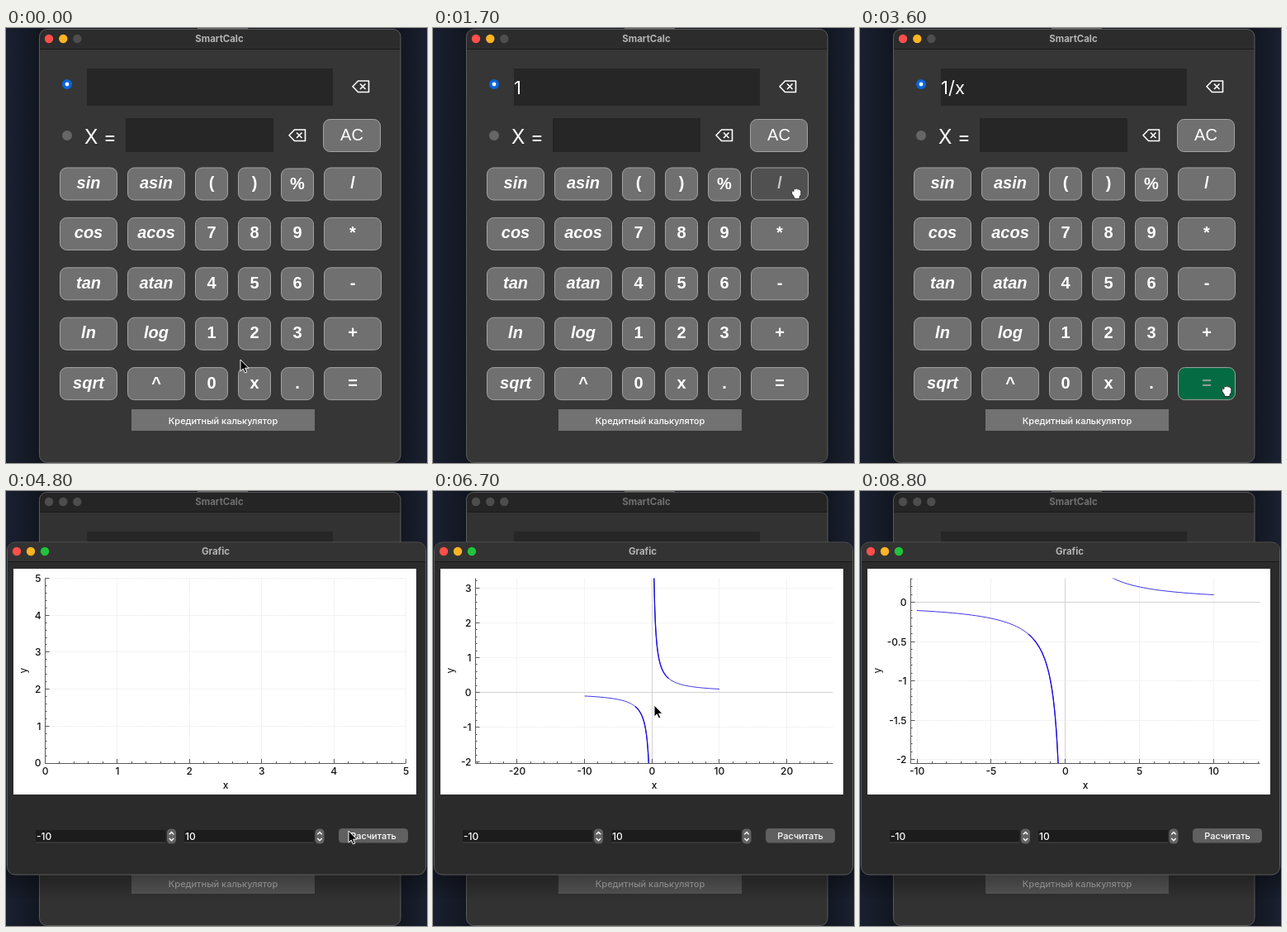
Write an HTML page that moves like this. It is 510 px wide and 526 px high and loops after 9400 ms.

```html
<!DOCTYPE html>
<html lang="ru">
<head>
<meta charset="utf-8">
<title>SmartCalc</title>
<style>
html, body { margin: 0; width: 100%; height: 100%; overflow: hidden; background: #161b27; }
svg { display: block; width: 510px; height: 526px; }
text { font-family: Inter, "Open Sans", sans-serif; fill: #fff; }
.title { font-size: 11.4px; font-weight: 700; fill: #b4b4b4; text-anchor: middle; }
.small { font-size: 11px; font-weight: 500; text-anchor: middle; }
.key rect { fill: #707070; stroke: #a3a3a3; }
.key text { font: bold 20px "Liberation Sans", Arial, sans-serif; text-anchor: middle; }
.key.fn text { font-style: italic; }
.key.ac text { font-weight: 400; }
.key.hover rect { fill: #505050; }
.key.hover text { fill: #c6c6c6; }
.key.eq.hover rect { fill: #046b43; }
.key.eq.hover text { fill: #8b9d94; }
.entry { font-size: 22px; }
.field { fill: #262626; }
.erase { fill: none; stroke: #fff; stroke-width: 1.6; stroke-linejoin: round; }
.spin { font-size: 12px; font-weight: 500; }
.dim .title { fill: #707070; }
.dim .bar { fill: #252525; }
.dim .body { fill: #323232; }
.dim .light { fill: #4d4d4d; }
.dim .credit rect { fill: #565656; }
.dim .credit text { fill: #a8a8a8; }
#plot text { font-size: 12px; font-weight: 500; fill: #111; }
#plot path { fill: none; }
.grid { stroke: #ececec; stroke-dasharray: 2 1; }
.zero { stroke: #d2d2d2; }
.axis { stroke: #5a5a5a; }
.curve { stroke: #2a1ee0; stroke-width: .9; }
.steep { stroke: #1a0ce0; stroke-width: 1.3; }
</style>
</head>
<body>
<svg viewBox="0 0 510 526">
  <defs>
    <linearGradient id="desk">
      <stop offset="0" stop-color="#1a2030"/><stop offset=".08" stop-color="#121620"/>
      <stop offset=".93" stop-color="#121620"/><stop offset="1" stop-color="#1a2030"/>
    </linearGradient>
    <linearGradient id="shade" x2="0" y2="1">
      <stop offset="0" stop-opacity=".4"/><stop offset="1" stop-opacity="0"/>
    </linearGradient>
    <clipPath id="win"><rect x="40.5" y="1.5" width="437.5" height="524" rx="9"/></clipPath>
    <clipPath id="area"><rect id="areaBox" y="105.5" height="223.5"/></clipPath>
    <g id="erase" class="erase">
      <path d="M7.5 1H20.5V14.5H7.5L1 7.8Z"/><path d="M10 4.5L16.5 11M16.5 4.5L10 11"/>
    </g>
    <g id="step">
      <rect width="11" height="18" rx="4.5" fill="#626262"/>
      <path d="M2.8 6.8L5.5 4L8.2 6.8M2.8 11.4L5.5 14.2L8.2 11.4" fill="none" stroke="#fff" stroke-width="1.4"/>
    </g>
  </defs>

  <rect width="510" height="526" fill="url(#desk)"/>
  <rect x="232" width="61" height="1" fill="#666"/>

  <g id="calc">
    <g clip-path="url(#win)">
      <rect class="body" x="40" y="1" width="439" height="525" fill="#363636"/>
      <rect class="bar" x="40" y="1" width="439" height="24" fill="#2c2c2c"/>
      <rect x="40" y="25" width="439" height="1" fill="#1c1c1c"/>
    </g>
    <rect x="40.5" y="1.5" width="437.5" height="524" rx="9" fill="none" stroke="#5b5b5b"/>
    <circle class="light" cx="52" cy="13" r="5.2" fill="#ff4f4b"/>
    <circle class="light" cx="69.3" cy="13" r="5.2" fill="#ffb423"/>
    <circle class="light" cx="86.3" cy="13" r="5.2" fill="#4e4e4e"/>
    <text class="title" x="258.5" y="16.6">SmartCalc</text>
    <rect class="field" x="98" y="49" width="298" height="45"/>
    <rect class="field" x="145" y="109" width="179" height="41"/>
    <circle cx="74" cy="68" r="6" fill="#0a66dc"/><circle cx="74" cy="68" r="2.4" fill="#fff"/>
    <circle cx="74" cy="130" r="6" fill="#666"/>
    <text x="95" y="140" font-size="24">X =</text>
    <text id="entry" class="entry" x="98" y="80"></text>
    <use href="#erase" x="419" y="63"/><use href="#erase" x="342" y="122"/>
    <g id="keys"></g>
    <g class="credit">
      <rect x="152" y="461" width="222" height="26" fill="#727272"/>
      <text class="small" x="263" y="479">Кредитный калькулятор</text>
    </g>
  </g>

  <g id="graph">
    <rect x="0" y="455" width="510" height="40" fill="url(#shade)"/>
    <rect x="1.5" y="62" width="507" height="402" rx="9.5" fill="#2b2b2b" stroke="#5a5a5a"/>
    <path d="M2 85V72Q2 62.5 11 62.5H499Q508 62.5 508 72V85Z" fill="#333"/>
    <rect x="2" y="85" width="506" height="1" fill="#191919"/>
    <circle cx="13" cy="73" r="5.2" fill="#ff4f4b"/>
    <circle cx="30" cy="73" r="5.2" fill="#ffb423"/>
    <circle cx="47" cy="73" r="5.2" fill="#1fc43c"/>
    <text class="title" x="254" y="76.7">Grafic</text>
    <rect x="9" y="94" width="488" height="273" fill="#fff"/>
    <g id="plot"></g>
    <rect x="36" y="410" width="157" height="15" fill="#1c1c1c"/><rect x="36" y="424.5" width="157" height="1" fill="#484848"/>
    <rect x="216" y="410" width="157" height="15" fill="#1c1c1c"/><rect x="216" y="424.5" width="157" height="1" fill="#484848"/>
    <text class="spin" x="37" y="422">-10</text>
    <text class="spin" x="217" y="422">10</text>
    <use href="#step" x="195" y="408.5"/><use href="#step" x="374.5" y="408.5"/>
    <rect id="run" x="403" y="408" width="84" height="17.5" rx="4.5" fill="#606060"/>
    <text class="small" x="445" y="420.6">Расчитать</text>
  </g>

  <g id="pointer">
    <path id="arrow" d="M0 0V14L3.3 11L5.5 16L7.8 15L5.6 10.2H10Z" fill="#000" stroke="#fff"/>
    <path id="hand" d="M-5.5 -2Q-4.5 -4 -3 -2.5V-4.5Q-1.8 -6.5 -.8 -5Q.5 -6.8 1.8 -5Q3.2 -6 4 -4.3Q5.8 -4.6 5.8 -2.5V1.5L4 4V6.5H-2.5V4.5L-5.3 .5Z" fill="#fff" stroke="#222" stroke-width=".9"/>
  </g>
</svg>
<script>
const $ = id => document.getElementById(id);
const LOOP = 9400, TICK = 100, OPEN = 3700, DRAWN = 5500, HIDE = 8800;

// Calculator keys
const cols = [[65, 70], [147, 70], [229, 40], [281, 40], [333, 40], [385, 70]];
const rows = ['sin asin ( ) % /', 'cos acos 7 8 9 *', 'tan atan 4 5 6 -', 'ln log 1 2 3 +', 'sqrt ^ 0 x . ='];
const keys = [];

function addKey(label, x, y, w, kind) {
  $('keys').insertAdjacentHTML('beforeend',
    `<g class="key ${kind}"><rect x="${x + .5}" y="${y + .5}" width="${w - 1}" height="39" rx="8"/>` +
    `<text x="${x + w / 2}" y="${y + 25.5}">${label}</text></g>`);
  keys.push({ el: $('keys').lastChild, x, y, w });
}
rows.forEach((row, r) => row.split(' ').forEach((label, c) => {
  const kind = label === '=' ? 'eq' : /[a-z]{2}/.test(label) ? 'fn' : '';
  addKey(label, cols[c][0], 168.5 + r * 60.4 + (label === '%' ? 1 : 0), cols[c][1], kind);
}));
addKey('AC', 384, 110, 70, 'ac');

// Tracks: [time, values...]
const pointerTrack = [
  [0, 284, 401], [600, 251, 374], [1000, 250, 373], [1600, 438, 202], [1700, 440, 200],
  [1900, 440, 200], [2000, 432, 224], [2400, 296, 432], [2500, 301, 432], [2900, 301, 432],
  [3400, 442, 438], [3600, 444, 439], [3700, 443, 434], [4000, 443, 434], [4500, 333, 298],
  [4600, 333, 298], [4800, 415, 411], [5200, 428, 418], [5400, 428, 418], [5600, 377, 388],
  [5800, 268, 259], [7100, 268, 259], [7600, 288, 163], [7700, 288, 163], [8200, 277, 152],
  [8300, 277, 152], [8800, 266, 142]
];
const zoomTrack = [[5900, 0], [6300, 6], [6700, 6], [7100, 1]];
const panTrack = [[7100, 0, 0], [7600, .12, -.707], [7700, .12, -.707], [8200, .72, -.82], [8300, .72, -.82], [8800, 1.31, -.933]];
const typed = [[900, '1'], [1900, '1/'], [2900, '1/x']];

function sample(track, t) {
  const i = track.findIndex(k => k[0] > t);
  if (i < 0) return track[track.length - 1].slice(1);
  if (i === 0) return track[0].slice(1);
  const a = track[i - 1], b = track[i], u = (t - a[0]) / (b[0] - a[0]);
  return a.slice(1).map((v, k) => v + (b[k + 1] - v) * u);
}

// Plot
const TOP = 105.5, BOTTOM = 329, RIGHT = 484.5;

function viewAt(t) {
  if (t < DRAWN) return { x: [0, 5], y: [0, 5] };
  const f = Math.pow(.85, -Math.round(sample(zoomTrack, t)[0]));
  const [dx, dy] = sample(panTrack, t);
  const scale = (c, half, d) => [-half, half].map(v => c + (v - c) * f + d);
  return { x: scale(-.2, 10, dx), y: scale(-.38, 1, dy) };
}

function ticks([lo, hi]) {
  const raw = (hi - lo) / 5, mag = Math.pow(10, Math.floor(Math.log10(raw)));
  const m = [1, 2, 2.5, 5, 10].reduce((a, b) => Math.abs(b - raw / mag) < Math.abs(a - raw / mag) ? b : a);
  const every = (s) => {
    const out = [];
    for (let i = Math.ceil(lo / s - 1e-6); i <= hi / s + 1e-6; i++) out.push(+(i * s).toFixed(6));
    return out;
  };
  return { major: every(m * mag), minor: every(m * mag / (m === 2 ? 4 : 5)) };
}

const labelWidth = s => [...s].reduce((w, c) => w + (c === '-' ? 4 : c === '.' ? 3.3 : 7), 0);
const snap = v => Math.floor(v) + .5;

function drawPlot(t) {
  const view = viewAt(t), tx = ticks(view.x), ty = ticks(view.y);
  const left = Math.round(41 + Math.max(...ty.major.map(v => labelWidth(String(v))))) - .5;
  const px = v => left + (v - view.x[0]) / (view.x[1] - view.x[0]) * (RIGHT - left);
  const py = v => BOTTOM - (v - view.y[0]) / (view.y[1] - view.y[0]) * (BOTTOM - TOP);
  let grid = '', zero = '', axis = `M${left} ${TOP}V329.5H${RIGHT}`, labels = '';

  const vline = v => `M${snap(px(v))} ${TOP}V${BOTTOM}`;
  const hline = v => `M${left} ${snap(py(v))}H${RIGHT}`;
  tx.major.forEach(v => {
    v ? grid += vline(v) : zero += vline(v);
    axis += `M${snap(px(v))} 329v-5`;
    labels += `<text x="${px(v)}" y="343" text-anchor="middle">${v}</text>`;
  });
  ty.major.forEach(v => {
    v ? grid += hline(v) : zero += hline(v);
    axis += `M${left} ${snap(py(v))}h5`;
    labels += `<text x="${left - 5}" y="${py(v) + 4.3}" text-anchor="end">${v}</text>`;
  });
  tx.minor.forEach(v => axis += `M${snap(px(v))} 329v-2`);
  ty.minor.forEach(v => axis += `M${left} ${snap(py(v))}h2`);

  const branch = (sign, far) => {
    let d = '';
    for (let i = 0; i <= 120; i++) {
      const x = sign * far * Math.pow(.04 / far, i / 120);
      d += (i ? 'L' : 'M') + px(x).toFixed(2) + ' ' + py(1 / x).toFixed(2);
    }
    return d;
  };
  const curve = t < DRAWN ? '' :
    `<g clip-path="url(#area)"><path class="curve" d="${branch(-1, 10) + branch(1, 10)}"/>` +
    `<path class="steep" d="${branch(-1, 2.5) + branch(1, 2.5)}"/></g>`;

  $('areaBox').setAttribute('x', left);
  $('areaBox').setAttribute('width', RIGHT - left);
  $('plot').innerHTML =
    `<path class="grid" d="${grid}"/><path class="zero" d="${zero}"/>${curve}<path class="axis" d="${axis}"/>${labels}` +
    `<text x="${(left + RIGHT) / 2}" y="359.5" text-anchor="middle">x</text>` +
    `<text transform="translate(25 217) rotate(-90)" text-anchor="middle" style="font-weight:400">y</text>`;
}

function render(t) {
  const open = t >= OPEN, [x, y] = sample(pointerTrack, t);
  let over = false;
  keys.forEach(k => {
    const hit = !open && x >= k.x && x <= k.x + k.w && y >= k.y && y <= k.y + 40;
    k.el.classList.toggle('hover', hit);
    over = over || hit;
  });
  $('entry').textContent = typed.reduce((s, [at, text]) => t >= at ? text : s, '');
  $('calc').setAttribute('class', open ? 'dim' : '');
  $('graph').style.display = open ? '' : 'none';
  $('run').setAttribute('fill', t >= 5200 && t < DRAWN ? '#7a7a7a' : '#606060');
  $('pointer').style.display = t < HIDE ? '' : 'none';
  $('pointer').setAttribute('transform', `translate(${x.toFixed(1)} ${y.toFixed(1)})`);
  $('arrow').style.display = over ? 'none' : '';
  $('hand').style.display = over ? '' : 'none';
  if (open) drawPlot(t);
}

const start = performance.now();
let last = -1;
function frame() {
  const t = Math.floor(Math.max(0, performance.now() - start) % LOOP / TICK) * TICK;
  if (t !== last) render(last = t);
  requestAnimationFrame(frame);
}
frame();
</script>
</body>
</html>
```
